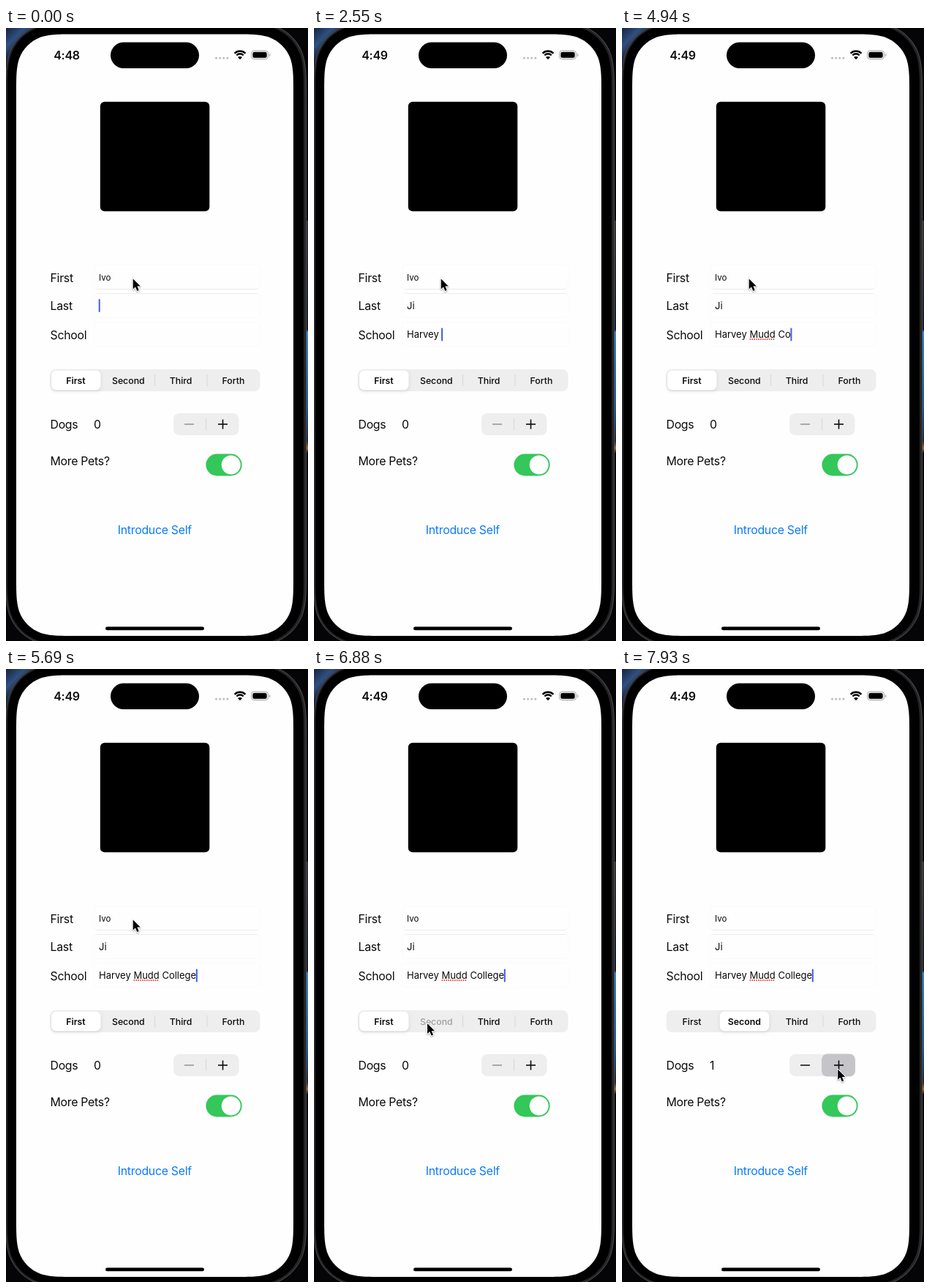
Animation, 413 px wide and 837 px high, one loop 8000 ms. Source, as an HTML page with a canvas:

```html
<!DOCTYPE html>
<html lang="en">
<head>
<meta charset="utf-8">
<title>Introduce yourself form</title>
<style>
html, body { margin: 0; width: 100%; height: 100%; overflow: hidden; background: #000; }
canvas { display: block; width: 413px; height: 837px; }
</style>
</head>
<body>
<canvas id="stage" width="413" height="837"></canvas>
<script>
const ctx = document.getElementById('stage').getContext('2d');
const LOOP = 8000;
const INK = '#0a0a0a';
const PANEL = '#eeeeef';
const FIELD_X = 127;

// Each track holds [start ms, value...]; values change hard.
const lastName = [[0, ''], [150, 'J'], [450, 'Ji']];
const school = [[0, ''], [1500, 'H'], [1800, 'Har'], [1950, 'Harv'], [2250, 'Harve'],
  [2400, 'Harvey'], [2550, 'Harvey '], [3000, 'Harvey M'], [3300, 'Harvey Mu'],
  [3590, 'Harvey Mudd'], [3890, 'Harvey Mudd '], [4640, 'Harvey Mudd C'],
  [4940, 'Harvey Mudd Co'], [5090, 'Harvey Mudd Col'], [5390, 'Harvey Mudd Coll'],
  [5540, 'Harvey Mudd Colleg'], [5690, 'Harvey Mudd College']];
const caretAlpha = [[0, 1], [1200, .4], [1350, 0], [1500, 1], [4340, .4], [4490, 0],
  [4640, 1], [6140, .4], [6290, 0], [6590, .4], [6740, 1], [7180, .4], [7330, 0],
  [7630, .5], [7780, 1]];
const pointer = [[0, 173.7, 342.4], [6140, 165, 386], [6290, 148.7, 454.2], [6440, 152, 476],
  [6590, 155, 484], [7180, 172, 484], [7330, 286.7, 552.2], [7480, 294, 548], [7630, 295.2, 546.7]];
const thumbShift = [[0, 0], [6890, .35], [7040, .88], [7180, 1]];

const at = (track, t) => track.findLast(step => step[0] <= t);

function box(x, y, w, h, r, color) {
  ctx.beginPath();
  ctx.roundRect(x, y, w, h, r);
  ctx.fillStyle = color;
  ctx.fill();
}

// Rectangle whose corners ease into the sides, as on the phone's casing.
function smoothBox(x, y, w, h, r, color) {
  const corners = [[x, y], [x + w, y], [x + w, y + h], [x, y + h]];
  ctx.beginPath();
  corners.forEach(([cx, cy], i) => {
    ctx.save();
    ctx.translate(cx, cy);
    ctx.rotate(i * Math.PI / 2);
    ctx.scale(r, r);
    ctx.lineTo(0, 1.529);
    ctx.bezierCurveTo(0, 1.088, 0, .868, .075, .631);
    ctx.bezierCurveTo(.169, .373, .373, .169, .631, .075);
    ctx.bezierCurveTo(.868, 0, 1.088, 0, 1.529, 0);
    ctx.restore();
  });
  ctx.fillStyle = color;
  ctx.fill();
}

function line(x1, y1, x2, y2, color, width = 1) {
  ctx.beginPath();
  ctx.moveTo(x1, y1);
  ctx.lineTo(x2, y2);
  ctx.strokeStyle = color;
  ctx.lineWidth = width;
  ctx.stroke();
}

function dot(x, y, r, color) {
  ctx.beginPath();
  ctx.arc(x, y, r, 0, Math.PI * 2);
  ctx.fillStyle = color;
  ctx.fill();
}

function setFont(size, weight = 400) {
  ctx.font = `${weight} ${size}px Inter, sans-serif`;
  ctx.letterSpacing = size > 15 ? '-0.25px' : '0px';
}

function label(text, x, y, { size = 15.8, weight = 400, color = INK, align = 'left' } = {}) {
  setFont(size, weight);
  ctx.textAlign = align;
  ctx.fillStyle = color;
  ctx.fillText(text, x, y);
}

function textWidth(text, size = 13) {
  setFont(size);
  return ctx.measureText(text).width;
}

function drawPhone() {
  ctx.fillStyle = '#050508';
  ctx.fillRect(0, 0, 413, 837);
  const sky = ctx.createLinearGradient(0, 0, 26, 26);
  sky.addColorStop(0, '#16233f');
  sky.addColorStop(.5, '#30507f');
  sky.addColorStop(1, '#0c1220');
  ctx.fillStyle = sky;
  ctx.fillRect(0, 0, 40, 50);
  const edge = ctx.createLinearGradient(0, 263, 0, 580);
  edge.addColorStop(0, '#30343c');
  edge.addColorStop(.47, '#161c28');
  edge.addColorStop(.48, '#2f86cc');
  edge.addColorStop(.8, '#1d5a9c');
  edge.addColorStop(.95, '#202838');
  edge.addColorStop(.98, '#b06a30');
  edge.addColorStop(1, '#16161a');
  ctx.fillStyle = edge;
  ctx.fillRect(410, 263, 3, 317);
  smoothBox(-1, -8, 412, 852, 68, '#4a4a4c');
  smoothBox(0, -7, 410, 850, 67, '#242426');
  smoothBox(2, -5, 405, 846, 65, '#000');
  smoothBox(14, 8.5, 379, 821.4, 53, '#fefefe');
}

function drawStatusBar(t) {
  label(t < 2400 ? '4:48' : '4:49', 83, 42.5, { size: 16, weight: 600, align: 'center' });
  box(143, 19.4, 121, 35.7, 17.85, '#000');
  for (let i = 0; i < 4; i++) dot(287.5 + i * 5.1, 41, 1.5, '#bcbcbe');

  ctx.strokeStyle = '#000';
  ctx.lineWidth = 2.4;
  for (const r of [10.5, 6.7]) {
    ctx.beginPath();
    ctx.arc(320, 42, r, -Math.PI * .75, -Math.PI * .25);
    ctx.stroke();
  }
  ctx.beginPath();
  ctx.moveTo(320, 43);
  ctx.arc(320, 43, 4.2, -Math.PI * .75, -Math.PI * .25);
  ctx.fillStyle = '#000';
  ctx.fill();

  ctx.beginPath();
  ctx.roundRect(335.5, 31, 23, 11.5, 3.8);
  ctx.strokeStyle = '#a5a5a5';
  ctx.lineWidth = 1;
  ctx.stroke();
  box(337.3, 32.8, 19.4, 7.9, 2.3, '#000');
  box(360, 35, 1.3, 4, 1, '#aaa');
}

function drawFields(t) {
  ['First', 'Last', 'School'].forEach((name, i) => label(name, 60.5, [346.8, 385.3, 425][i]));
  for (const y of [323.5, 362.5, 401.5]) {
    ctx.beginPath();
    ctx.roundRect(120.5, y, 227, 33, 5);
    ctx.strokeStyle = '#fafafa';
    ctx.lineWidth = 1;
    ctx.stroke();
  }
  line(124, 356.5, 344, 356.5, '#ececec');
  line(124, 362.5, 344, 362.5, '#ececec');

  const last = at(lastName, t)[1];
  const place = at(school, t)[1];
  label('Ivo', FIELD_X, 345, { size: 11.5 });
  label(last, FIELD_X, 383.7, { size: 13 });
  label(place, FIELD_X, 423.3, { size: 13 });

  if (t >= 3890) {
    const start = FIELD_X + textWidth('Harvey ');
    const end = FIELD_X + textWidth('Harvey Mudd');
    for (let x = start + 1; x < end; x += 2.9) dot(x, 425, 1, '#e8423a');
  }

  const inLast = t < 750;
  const caretX = FIELD_X + textWidth(inLast ? last : place);
  ctx.globalAlpha = at(caretAlpha, t)[1];
  box(caretX - .3, inLast ? 370 : 409.5, 2, 18, 1, '#3f5fdc');
  ctx.globalAlpha = 1;
}

function drawSegments(t) {
  const shift = at(thumbShift, t)[1];
  const picked = shift > .5 ? 1 : 0;
  box(60.5, 466, 287, 30, 8, PANEL);
  [132, 203.5, 275].forEach((x, i) => {
    if (i !== picked && i !== picked - 1) line(x, 473, x, 489, '#d8d8da');
  });
  ctx.save();
  ctx.shadowColor = 'rgba(0,0,0,.12)';
  ctx.shadowBlur = 4;
  ctx.shadowOffsetY = 1.5;
  box(62 + shift * 71.7, 467.5, 67.5, 27, 6.5, '#fff');
  ctx.restore();
  ['First', 'Second', 'Third', 'Forth'].forEach((name, i) => {
    const held = i === 1 && t >= 6740 && t < 6890;
    label(name, 95.5 + i * 71.8, 485.6, {
      size: 12.3, weight: i === picked ? 600 : 500,
      color: held ? '#a0a0a2' : INK, align: 'center'
    });
  });
}

function drawPets(t) {
  const pressed = t >= 7780;
  label('Dogs', 60.5, 547);
  label(pressed ? '1' : '0', 120, 547);
  box(229, 526, 89.5, 30, 8, PANEL);
  if (pressed) box(273, 525.5, 46, 31, 8, '#c5c5c9');
  else line(273.5, 533, 273.5, 549, '#d6d6d8');
  line(244, 541, 257, 541, pressed ? INK : '#939396', 1.5);
  line(290, 541, 303, 541, INK, 1.6);
  line(296.5, 534.5, 296.5, 547.5, INK, 1.6);

  label('More Pets?', 60.5, 597.3);
  box(273.4, 581.5, 49.2, 29.9, 14.95, '#34c759');
  dot(307.7, 596.45, 13, '#fff');
}

function drawPointer(t) {
  const [, x, y] = at(pointer, t);
  ctx.save();
  ctx.translate(x, y);
  ctx.beginPath();
  [[0, 0], [0, 14], [3.2, 11.1], [5.6, 16.6], [8, 15.6], [5.7, 10.2], [10, 10]]
    .forEach(([px, py]) => ctx.lineTo(px, py));
  ctx.closePath();
  ctx.lineJoin = 'round';
  ctx.shadowColor = 'rgba(0,0,0,.35)';
  ctx.shadowBlur = 2;
  ctx.shadowOffsetY = 1;
  ctx.strokeStyle = '#fff';
  ctx.lineWidth = 2;
  ctx.stroke();
  ctx.shadowColor = 'transparent';
  ctx.fillStyle = '#000';
  ctx.fill();
  ctx.restore();
}

function draw(t) {
  drawPhone();
  drawStatusBar(t);
  box(128.8, 100.8, 149.5, 149.5, 6, '#000');
  drawFields(t);
  drawSegments(t);
  drawPets(t);
  label('Introduce Self', 203.3, 690.8, { color: '#0a7aff', align: 'center' });
  box(136, 817.5, 135, 4.8, 2.4, '#000');
  drawPointer(t);
}

const begin = performance.now();
function tick() {
  draw((performance.now() - begin) % LOOP);
  requestAnimationFrame(tick);
}
tick();
</script>
</body>
</html>
```
